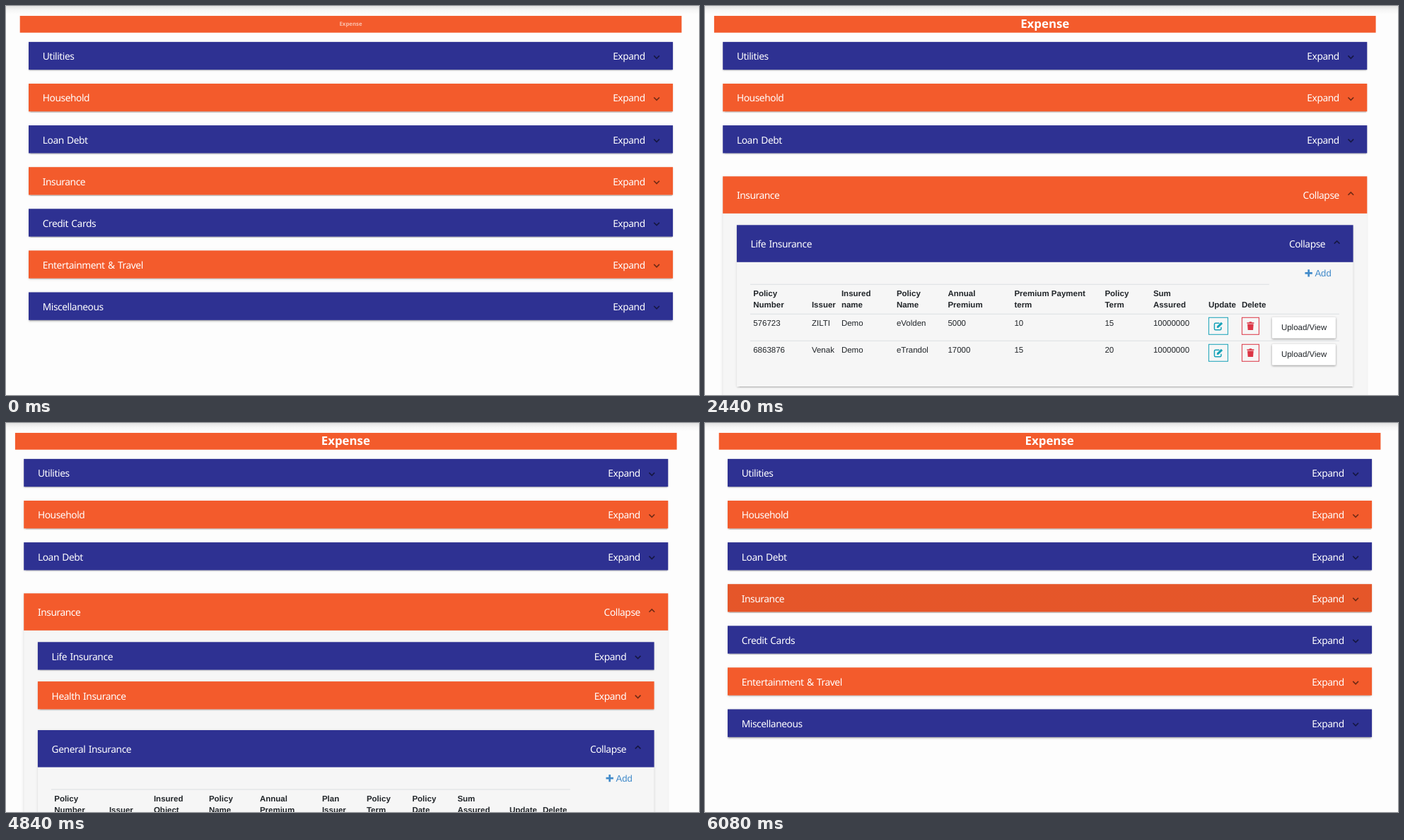
An HTML page that plays this animation: 980 by 551 pixels, repeating every 6.44 s.

```html
<!DOCTYPE html>
<html lang="en">
<head>
<meta charset="utf-8">
<title>Expense</title>
<style>
html, body { margin: 0; width: 100%; height: 100%; overflow: hidden; background: #fdfdfd; }
#stage { position: relative; width: 100%; height: 100%; overflow: clip; contain: strict; text-rendering: geometricPrecision; }
#stage::before { content: ""; position: absolute; width: 100%; height: 12px; background: linear-gradient(#e2e2e2, #f6f6f6 50%, #fdfdfd); }
#page { position: absolute; left: 0; top: 0; width: 1194px; transform-origin: 0 0; font-family: "Noto Sans", sans-serif; color: #fff; }
#title { position: absolute; left: 23.5px; top: 16.8px; width: 1140px; height: 29.5px; line-height: 29.6px; background: #f35b2c; text-align: center; }
#title b { display: block; font-size: 20.5px; }
.list { display: flex; flex-direction: column; gap: 24px; }
#page > .list { position: absolute; left: 39px; top: 62.1px; width: 1110px; }
.list .list { gap: 20px; padding: 20px 24px 16px; }
.panel { margin: calc(16px * var(--p)) 0; background: #f6f6f6;
  box-shadow: 0 3px 1px -2px #0003, 0 2px 2px #00000024, 0 1px 5px #0000001f; }
.list .list > :first-child { margin-top: 0; }
.list .list > :last-child { margin-bottom: 0; }
.head { position: relative; display: flex; justify-content: space-between; align-items: center;
  height: calc(48px + 16px * var(--p)); padding: 0 48px 0 24px; background-color: #2e3192;
  font-size: 16.8px; letter-spacing: -.52px; word-spacing: 1.4px; white-space: nowrap; }
.panel:nth-child(even) > .head { background-color: #f35b2c; }
.head.hover { background-image: linear-gradient(#0000000f, #0000000f); }
.head svg { position: absolute; right: 20px; top: calc(50% - 8px); width: 16px; height: 16px;
  fill: none; stroke: #0000008a; stroke-width: 2; transform: rotate(calc(180deg * var(--p))); }
.body { display: grid; }
.clip { overflow: hidden; min-height: 0; }
.table { display: block; width: 100%; font: 11.5px "Liberation Sans", Arial, sans-serif; fill: #212529; }
.table .h { font-weight: bold; }
.add { fill: var(--add); font-size: 13.1px; }
.line { stroke: #dcdfe2; }
.upload { fill: #fff; filter: drop-shadow(0 1.5px 1.5px #0006); }
</style>
</head>
<body>
<div id="stage"><div id="page"><div id="title"><b>Expense</b></div></div></div>
<script>
const LOOP = 6440, SCALE = .8208, SLIDE = 225;
const TEAL = "#17a2b8", RED = "#dc3545";

// When each panel is open, and when the pointer rests on a closed one
const open = {
  "Insurance": [1280, 5840],
  "Life Insurance": [2200, 3265],
  "Health Insurance": [3265, 4600],
  "General Insurance": [4600, 5440]
};
const hovers = [
  ["Utilities", 80, 240], ["Household", 240, 480], ["Loan Debt", 480, 760],
  ["Insurance", 760, 1280], ["Life Insurance", 2000, 2200], ["Insurance", 5840, LOOP]
];

function bezier(x1, y1, x2, y2) {
  const at = (a, b, u) => 3 * a * u * (1 - u) ** 2 + 3 * b * u * u * (1 - u) + u ** 3;
  return x => {
    if (x <= 0) return 0;
    if (x >= 1) return 1;
    let lo = 0, hi = 1;
    for (let i = 0; i < 24; i++) {
      const mid = (lo + hi) / 2;
      if (at(x1, x2, mid) < x) lo = mid; else hi = mid;
    }
    return at(y1, y2, lo);
  };
}
const slide = bezier(.4, 0, .2, 1), ease = bezier(.25, .1, .25, 1);

const text = (x, y, s, cls = "") => `<text x="${x}" y="${y}" class="${cls}">${s}</text>`;
const line = (y, end) => `<path class="line" d="M64 ${y}H${end}"/>`;
const box = (x, y, w, color, icon) =>
  `<rect x="${x + .5}" y="${y + .5}" width="${w - 1}" height="24" fill="none" stroke="${color}"/>
   <g transform="translate(${x + w / 2} ${y + 12.5})">${icon}</g>`;
const pencil = `<path d="M1.5-4H-4q-1.5 0-1.5 1.5V4q0 1.5 1.5 1.5H2.5Q4 5.5 4 4V1.5" fill="none" stroke="${TEAL}" stroke-width="1.5"/>
  <path d="M-2.2 2.8-1.8.3 4-5.6 6.2-3.4.3 2.4z" fill="${TEAL}"/>`;
const trash = `<path d="M-5-5H-2L-1.5-6H1.5L2-5H5V-3.5H-5zM-4.3-2.7H4.3L3.7 5.8H-3.7z" fill="${RED}"/>`;

// Columns end with Update and Delete; "|" breaks a heading in two lines
function table(height, end, xs, heads, rows) {
  const two = heads.some(h => h.includes("|")), top = two ? 73.5 : 57.5;
  const [edit, del] = xs.slice(-2);
  let s = `<path d="M848.6 15.6H859M853.8 10.4V20.8" style="stroke:var(--add)" stroke-width="2.7"/>`
    + text(862.5, 20.2, "Add", "add") + line(31.5, end) + line(top, 897);
  heads.forEach((h, i) => {
    const parts = h.split("|");
    parts.forEach((part, k) =>
      s += text(xs[i], 48.2 + 16.2 * (k + (two ? 2 - parts.length : 0)), part, "h"));
  });
  rows.forEach((row, r) => {
    const y = top + 38 * r, b = y + 4.5;
    if (r) s += line(y, 897);
    row.forEach((cell, i) => s += text(xs[i], y + 16.5, cell));
    s += box(edit, b, 28, TEAL, pencil) + box(del, b, 25, RED, trash)
      + `<rect class="upload" x="${end + 4}" y="${b}" width="90" height="30" rx="1.5"/>`
      + text(end + 17, b + 18.3, "Upload/View");
  });
  return `<svg class="table" viewBox="45 0 871.7 ${height}">${s}</svg>`;
}

const panel = (name, body = "") => `<div class="panel" data-name="${name}">
  <div class="head"><span>${name}</span><span></span><svg viewBox="-8 -8 16 16"><path d="M-4.7-.2 0 4.5 4.7-.2"/></svg></div>
  <div class="body"><div class="clip">${body}</div></div></div>`;
const list = items => `<div class="list">${items.join("")}</div>`;

const life = table(176.2, 798,
  [68.3, 151, 193, 271, 343.5, 437.5, 565.5, 634, 712, 759],
  ["Policy|Number", "Issuer", "Insured|name", "Policy|Name", "Annual|Premium", "Premium Payment|term", "Policy|Term", "Sum|Assured", "Update", "Delete"],
  [["576723", "ZILTI", "Demo", "eVolden", "5000", "10", "15", "10000000"],
   ["6863876", "Venak", "Demo", "eTrandol", "17000", "15", "20", "10000000"]]);
const health = table(122, 789.5,
  [68.3, 163.5, 252, 341, 423.5, 531, 608, 697, 747],
  ["Policy Number", "Issuer", "Insured name", "Policy Name", "Annual Premium", "Policy Term", "Sum Assured", "Update", "Delete"],
  [["87284787", "ZILTI Morvane", "Demo", "eMedrin", "22000", "1", "700000"]]);
const general = table(140, 798,
  [68.3, 146, 209, 287, 359, 447, 510, 574.5, 638.5, 712, 759],
  ["Policy|Number", "Issuer", "Insured|Object", "Policy|Name", "Annual|Premium", "Plan|Issuer", "Policy|Term", "Policy|Date", "Sum|Assured", "Update", "Delete"],
  []);

const page = document.getElementById("page");
page.insertAdjacentHTML("beforeend", list([
  panel("Utilities"), panel("Household"), panel("Loan Debt"),
  panel("Insurance", list([
    panel("Life Insurance", life), panel("Health Insurance", health), panel("General Insurance", general)
  ])),
  panel("Credit Cards"), panel("Entertainment &amp; Travel"), panel("Miscellaneous")
]));
const title = page.querySelector("b");
const panels = [...page.querySelectorAll(".panel")];

function openness(name, t) {
  const [a, b] = open[name] || [LOOP, LOOP];
  return slide((t - a) / SLIDE) - slide((t - b) / SLIDE);
}

function draw(t) {
  for (const el of panels) {
    const name = el.dataset.name, [head, body] = el.children, p = openness(name, t);
    const [a, b] = open[name] || [LOOP, LOOP];
    el.style.setProperty("--p", p);
    body.style.gridTemplateRows = p + "fr";
    head.children[1].textContent = t >= a && t < b ? "Collapse" : "Expand";
    head.classList.toggle("hover", hovers.some(([n, from, to]) => n === name && t >= from && t < to));
  }
  // The scrollbar nudges the page once the content overflows
  const shift = openness("Insurance", t) > .4 ? -6.8 : 0;
  page.style.transform = `translateX(${shift}px) scale(${SCALE})`;
  page.style.setProperty("--add", t >= 2840 && t < 3000 ? "#2a6496" : "#428bca");

  const zoom = (t + 190) / 1100;
  title.style.transform = `scale(${.3 + .7 * ease(zoom)})`;
  title.style.opacity = ease(zoom * 2);
}

const start = performance.now();
function tick() {
  draw((performance.now() - start) % LOOP);
  requestAnimationFrame(tick);
}
tick();
</script>
</body>
</html>
```
